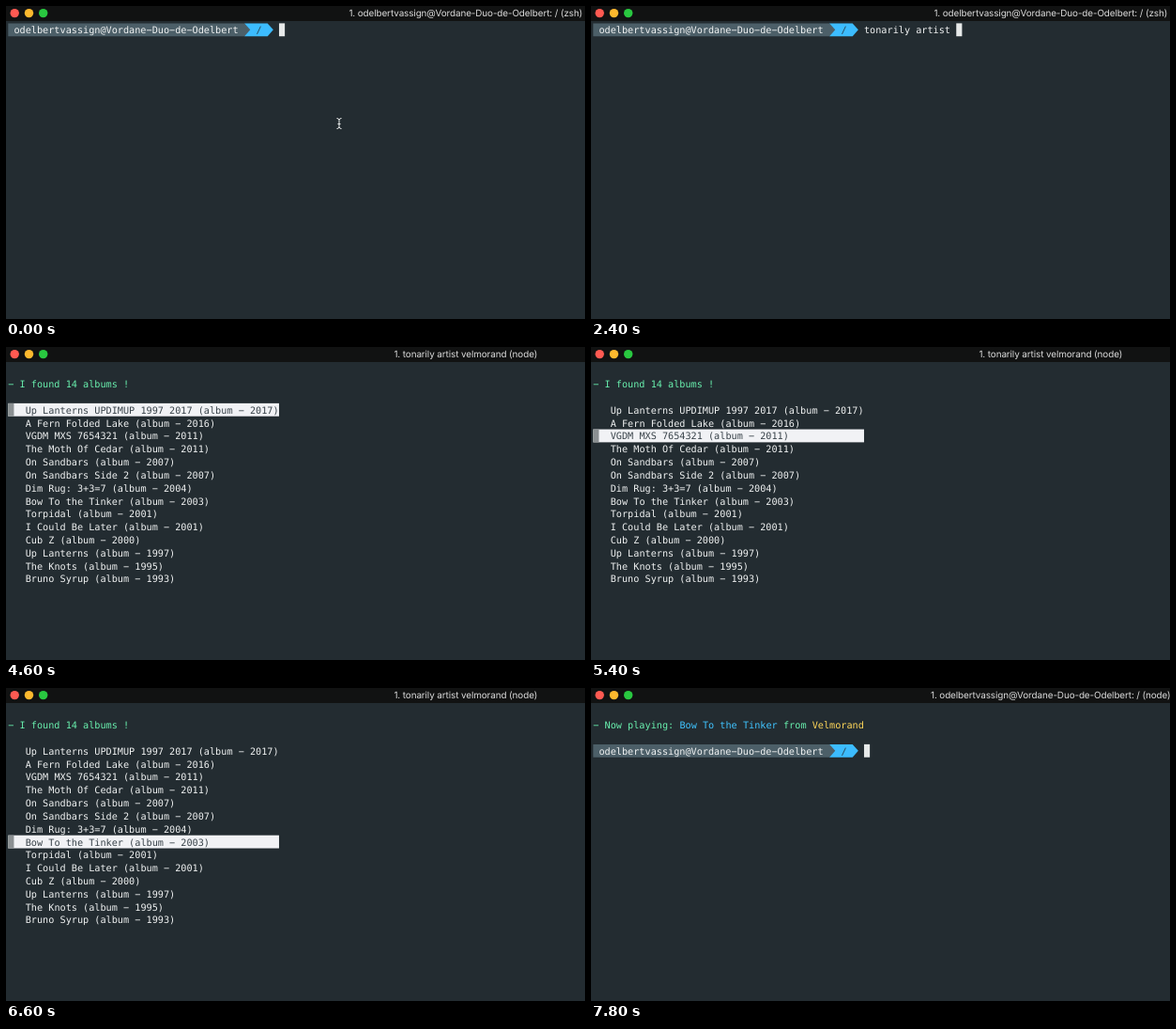
Animation, 617 px wide and 333 px high, one loop 8000 ms. Source, as an HTML page:

```html
<!DOCTYPE html>
<html lang="en">
<head>
<meta charset="utf-8">
<title>Terminal session</title>
<style>
  html, body { margin: 0; width: 100%; height: 100%; overflow: hidden; background: #232c31; }
  svg { display: block; width: 100vw; height: 100vh; }
  text { white-space: pre; text-rendering: geometricPrecision; }
  .mono { font: 10.2px "DejaVu Sans Mono", monospace; }
  .title { font: 9.9px Inter, sans-serif; letter-spacing: -0.09px; text-anchor: middle; fill: #dcdcdc; }
</style>
</head>
<body>
<svg viewBox="0 0 617 333">
  <rect width="617" height="333" fill="#232c31"/>
  <rect width="617" height="16" fill="#111212"/>
  <circle cx="9.2" cy="7.6" r="4.7" fill="#ff5a52"/>
  <circle cx="24.5" cy="7.6" r="4.7" fill="#fdb92e"/>
  <circle cx="39.7" cy="7.6" r="4.7" fill="#29c840"/>
  <text id="title" class="title" x="489.8" y="11.4"></text>
  <g id="screen" class="mono"></g>
  <path id="pointer" d="M352.5 119.5q2 0 2.5 1.5q.5-1.5 2.5-1.5M355 121v8.500M352.500 130.500q2 0 2.500-1.500q.5 1.500 2.500 1.500M353.500 125.500h3"
        fill="none" stroke="#eef0f0" stroke-width="1"/>
</svg>
<script>
const LOOP = 8000, STEP = 200;
const LEFT = 2.3, TOP = 18.4, CW = 6.142, RH = 13.83;
const WHITE = '#f0f2f2', GREEN = '#69f0ae', BLUE = '#40c4ff', YELLOW = '#ffd75a', SLATE = '#4c5f68';

const HOST = 'odelbertvassign@Vordane-Duo-de-Odelbert';
const COMMAND = 'tonarily artist velmorand';
const ALBUMS = [
  ['Up Lanterns UPDIMUP 1997 2017', 2017],
  ['A Fern Folded Lake', 2016],
  ['VGDM MXS 7654321', 2011],
  ['The Moth Of Cedar', 2011],
  ['On Sandbars', 2007],
  ['On Sandbars Side 2', 2007],
  ['Dim Rug: 3+3=7', 2004],
  ['Bow To the Tinker', 2003],
  ['Torpidal', 2001],
  ['I Could Be Later', 2001],
  ['Cub Z', 2000],
  ['Up Lanterns', 1997],
  ['The Knots', 1995],
  ['Bruno Syrup', 1993]
];
const CHOICE = 7;

const $ = id => document.getElementById(id);
const colX = c => LEFT + c * CW;
const rowY = r => TOP + r * RH;

// Terminal hyphens are drawn wide, as minus signs.
const put = (col, row, str, fill = WHITE) =>
  `<text x="${colX(col)}" y="${rowY(row) + 10.8}" fill="${fill}">${str.replace(/-/g, '\u2212')}</text>`;
const block = (col, row, n, fill) =>
  `<rect x="${colX(col)}" y="${rowY(row)}" width="${n * CW}" height="${RH}" fill="${fill}"/>`;
const cursor = (col, row) => block(col, row, 1, '#e6e9e9');

function arrow(from, to, row, fill) {
  const y = rowY(row), x = colX(to);
  return `<path d="M${colX(from)} ${y}H${x}L${x + CW} ${y + RH / 2}L${x} ${y + RH}H${colX(from)}Z" fill="${fill}"/>`;
}

function prompt(row) {
  return arrow(41, 45, row, '#3cbcff') + arrow(0, 41, row, SLATE) +
    put(1, row, HOST) + put(43, row, '/', '#2a4656');
}

function list(selected, closed) {
  let out = put(0, 1, `- I found ${ALBUMS.length} albums !`, GREEN);
  ALBUMS.forEach(([name, year], i) => {
    const row = i + 3, on = i === selected;
    if (on) out += block(0, row, 47, '#f1f2f5') + block(0, row, 1, '#8b9092');
    out += put(3, row, `${name} (album - ${year})`, on ? '#39434a' : WHITE);
  });
  return closed ? out + cursor(0, 17) : out;
}

function nowPlaying() {
  const parts = [['- Now playing: ', GREEN], [ALBUMS[CHOICE][0], BLUE], [' from ', GREEN], ['Velmorand', YELLOW]];
  let col = 0, out = '';
  for (const [str, fill] of parts) {
    out += put(col, 1, str, fill);
    col += str.length;
  }
  return out;
}

function typedCount(k) {
  if (k <= 6) return Math.floor(k * 7 / 6);
  if (k <= 12) return Math.floor(7 + (k - 6) * 1.5);
  return Math.min(COMMAND.length, Math.floor(16 + (k - 12) * 1.8));
}

function screenAt(k) {
  const t = k * STEP;
  if (t < 4400) {
    const n = typedCount(k), sent = t >= 3600;
    return prompt(0) + put(47, 0, COMMAND.slice(0, n)) + (sent ? cursor(0, 1) : cursor(47 + n, 0));
  }
  if (t < 7000) {
    const selected = Math.max(0, Math.min(CHOICE, k - 25));
    return list(selected, t >= 6800);
  }
  if (t < 7200) return cursor(0, 1);
  return nowPlaying() + (t < 7600 ? cursor(0, 3) : prompt(3) + cursor(47, 3));
}

function titleAt(t) {
  if (t >= 3600 && t < 7200) return `1. ${COMMAND} (node)`;
  return `1. ${HOST}: / (${t < 3600 ? 'zsh' : 'node'})`;
}

let shown = -1;
function draw(now) {
  const k = Math.floor((now % LOOP) / STEP);
  if (k !== shown) {
    shown = k;
    $('title').textContent = titleAt(k * STEP);
    $('screen').innerHTML = screenAt(k);
    $('pointer').style.display = k ? 'none' : '';
  }
}

const start = performance.now();
function tick() {
  draw(performance.now() - start);
  requestAnimationFrame(tick);
}
tick();
</script>
</body>
</html>
```
